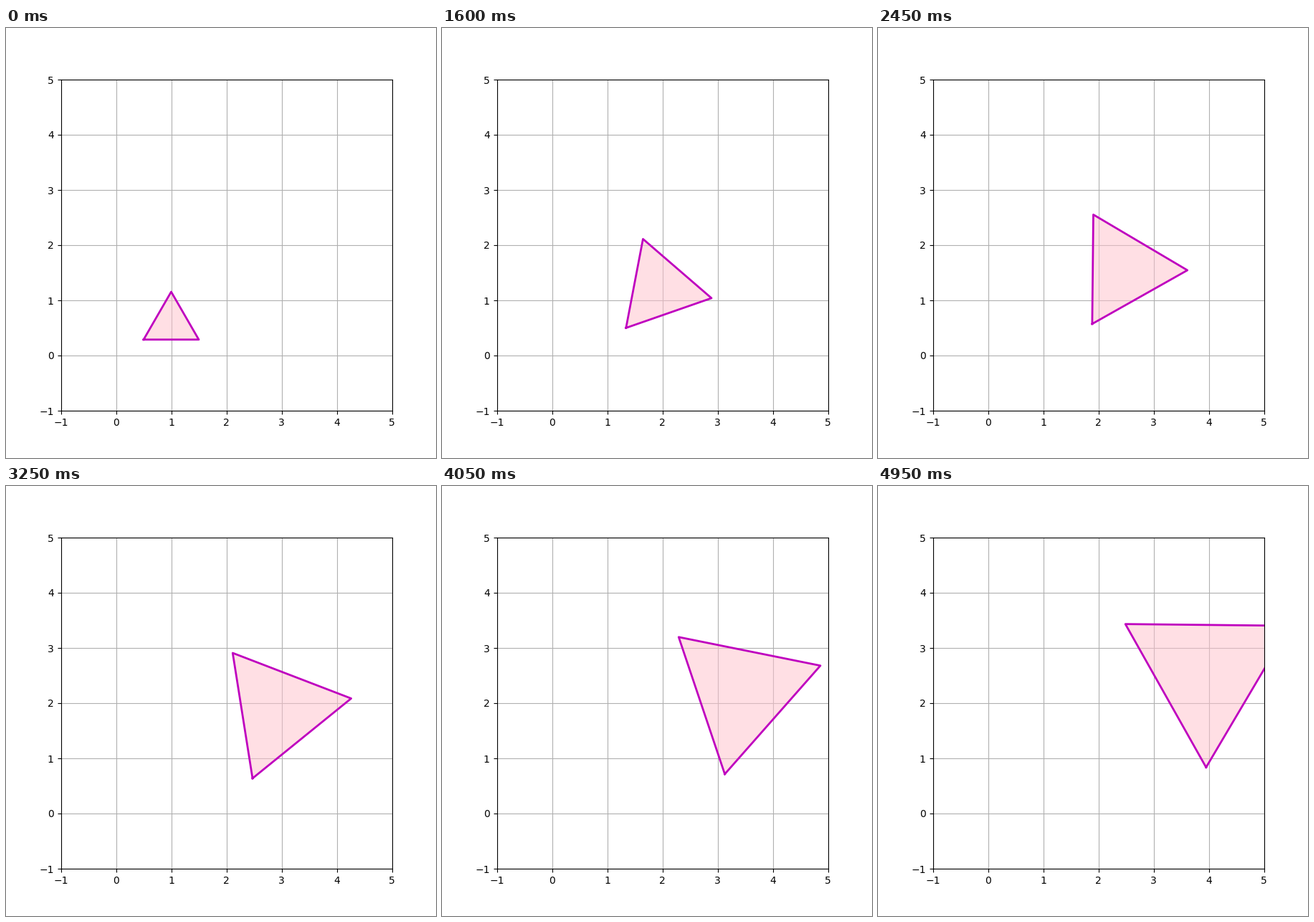
These frames come from a looping animation (600x600 px, 5000 ms). A matplotlib script:

```python
import numpy as np
import matplotlib.pyplot as plt
from matplotlib.animation import FuncAnimation

FRAMES = 100
INTERVAL = 50
CORNERS = np.radians([210, 330, 90])  # bottom left, bottom right, top
RADIUS = 1 / np.sqrt(3)               # circumradius of a unit triangle


def triangle(t):
    """Closed outline that shifts, grows threefold and turns 60 degrees."""
    center = np.array([1 + 3 * t, RADIUS + 2 * t])
    angles = CORNERS + np.radians(60) * t
    spokes = np.column_stack([np.cos(angles), np.sin(angles)])
    points = center + RADIUS * (1 + 2 * t) * spokes
    return np.vstack([points, points[:1]])


fig, ax = plt.subplots(figsize=(6, 6), dpi=100)
ax.set_aspect("equal")
ax.set_xlim(-1, 5)
ax.set_ylim(-1, 5)
ax.grid(True)
ax.set_axisbelow(True)

start = triangle(0)
fill, = ax.fill(*start.T, color="pink", alpha=0.5, lw=0)
line, = ax.plot(*start.T, color="m", lw=2)


def update(frame):
    points = triangle(frame / FRAMES)
    fill.set_xy(points)
    line.set_data(*points.T)
    return fill, line


anim = FuncAnimation(fig, update, frames=FRAMES, interval=INTERVAL,
                     repeat=True, repeat_delay=0)
plt.show()
```
